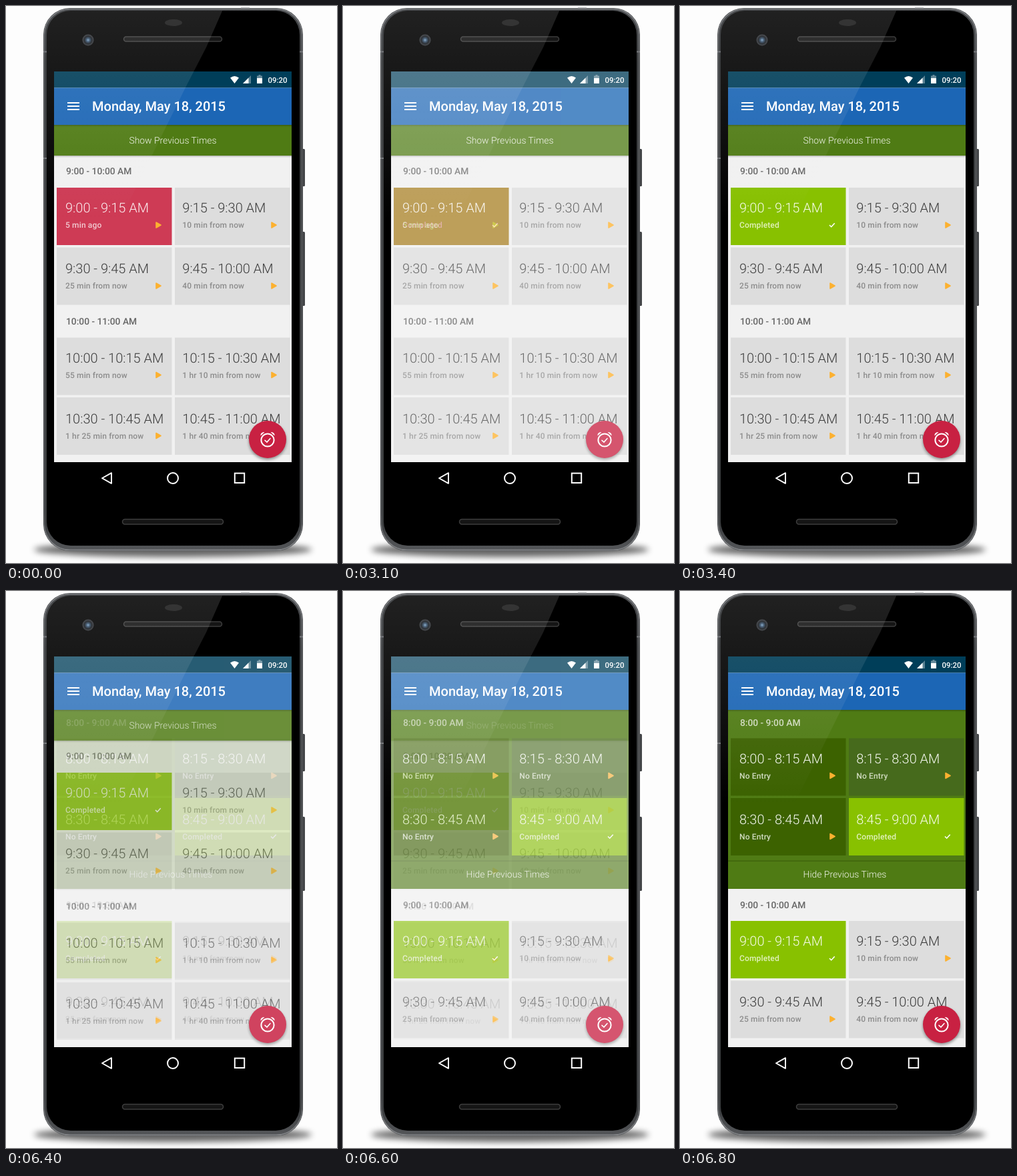
Write an HTML page that moves like this. It is 496x834 px and loops after 9.8 s.

```html
<!DOCTYPE html>
<html lang="en">
<head>
<meta charset="utf-8">
<title>Schedule</title>
<style>
  html, body { margin: 0; width: 100%; height: 100%; overflow: hidden; background: #fdfdfd; }
  svg { display: block; width: 496px; height: 834px; }
  text { font-family: Roboto, "Open Sans", sans-serif; text-rendering: geometricPrecision; }
  .title { font-size: 20px; font-weight: 500; }
  .time { font-size: 20px; font-weight: 300; }
  .note { font-size: 12px; font-weight: 500; letter-spacing: .14px; }
  .head { font-size: 13.8px; font-weight: 500; }
  .bar { font-size: 13.9px; font-weight: 300; text-anchor: middle; }
  .clock { font-size: 11.4px; font-weight: 500; }
  .line { fill: none; stroke: #fff; stroke-width: 2; }
  .thin { stroke-width: 1.6; }
</style>
</head>
<body>
<svg viewBox="0 0 496 834">
  <defs>
    <linearGradient id="metal" x2="0" y2="1">
      <stop offset="0" stop-color="#4b4d50"/>
      <stop offset=".1" stop-color="#3a3c3e"/>
      <stop offset=".95" stop-color="#3a3c3e"/>
      <stop offset="1" stop-color="#56585b"/>
    </linearGradient>
    <linearGradient id="rim" x2="0" y2="1">
      <stop offset="0" stop-color="#808285"/>
      <stop offset=".1" stop-color="#606265"/>
      <stop offset=".93" stop-color="#55575a"/>
      <stop offset="1" stop-color="#85878a"/>
    </linearGradient>
    <linearGradient id="gloss" gradientUnits="userSpaceOnUse" x1="0" y1="4" x2="0" y2="320">
      <stop offset="0" stop-color="#fff" stop-opacity=".13"/>
      <stop offset=".6" stop-color="#fff" stop-opacity=".06"/>
      <stop offset="1" stop-color="#fff" stop-opacity="0"/>
    </linearGradient>
    <linearGradient id="fall" x2="0" y2="1">
      <stop offset="0" stop-opacity=".25"/>
      <stop offset="1" stop-opacity="0"/>
    </linearGradient>
    <radialGradient id="lens">
      <stop offset="0" stop-color="#7ea3c6"/>
      <stop offset=".35" stop-color="#30475f"/>
      <stop offset=".65" stop-color="#15191e"/>
      <stop offset="1" stop-color="#3a3d42"/>
    </radialGradient>
    <filter id="blur" x="-20%" y="-100%" width="140%" height="300%">
      <feGaussianBlur stdDeviation="5"/>
    </filter>
    <filter id="soft" x="-30%" y="-30%" width="160%" height="160%">
      <feGaussianBlur stdDeviation="2"/>
    </filter>
    <clipPath id="glass"><rect x="72" y="98" width="356" height="585"/></clipPath>
    <clipPath id="face"><rect x="61" y="7" width="379" height="801" rx="36"/></clipPath>
  </defs>

  <!-- phone body -->
  <ellipse cx="250" cy="814" rx="208" ry="11" fill="#000" opacity=".6" filter="url(#blur)"/>
  <rect x="443" y="214" width="5" height="56" rx="1.5" fill="#45474a"/>
  <rect x="443" y="338" width="5" height="111" rx="1.5" fill="#45474a"/>
  <rect x="56" y="3" width="389" height="813" rx="40" fill="url(#metal)"/>
  <rect x="57.5" y="4.5" width="386" height="810" rx="38.5" fill="none" stroke="url(#rim)" stroke-width="1.6"/>
  <path d="M352 3.5h13M56 68.5h5M440 68.5h5M56 228h5" stroke="#77797c" stroke-width="2"/>
  <rect x="61" y="7" width="379" height="801" rx="36" fill="#000"/>
  <ellipse cx="251" cy="25" rx="13" ry="5" fill="#191919"/>
  <circle cx="123" cy="51" r="8.5" fill="url(#lens)"/>
  <g fill="#151515" stroke="#3d3d3d" stroke-width="1.5">
    <rect x="176.5" y="46" width="147" height="7" rx="3.5"/>
    <rect x="174.5" y="768.5" width="151" height="7.5" rx="3.7"/>
  </g>
  <g class="line">
    <path d="M144 707L158 699.2V714.8Z" stroke-linejoin="round"/>
    <circle cx="250" cy="707" r="8"/>
    <rect x="342.8" y="699.6" width="14.4" height="14.4"/>
  </g>

  <g clip-path="url(#glass)">
    <rect x="72" y="98" width="356" height="585" fill="#fff"/>
    <g id="due"></g>
    <g id="done"></g>
    <g id="past"></g>
  </g>
  <path d="M326 3L300 62L270 120L218 225L171 320H56V3Z" fill="url(#gloss)" clip-path="url(#face)"/>
</svg>

<script>
const rect = (x, y, w, h, fill) =>
  `<rect x="${x}" y="${y}" width="${w}" height="${h}" fill="${fill}"/>`;
const text = (x, y, cls, fill, str) =>
  `<text x="${x}" y="${y}" class="${cls}" fill="${fill}">${str}</text>`;

const style = (fill, ink, note, checked) => ({ fill, ink, note, checked });
const plain = style('#dddddd', '#3c3c3c', '#8c8c8c');
const late = style('#ce3b55', '#fbeef0', '#f2cad1');
const complete = style('#88c100', '#f8fcec', '#e2f1bd', true);
const dark = style('#3c6200', '#f5f8f0', '#d0dbbf');
const dim = style('#466a1c', '#f5f8f0', '#d0dbbf');

const play = (x, y) =>
  `<path d="M${x + 1} ${y - 4}l7 4l-7 4z" fill="#fcb130" stroke="#fcb130" stroke-width="1.6" stroke-linejoin="round"/>`;
const tick = (x, y) =>
  `<path d="M${x} ${y}l2.7 2.7l5 -5.5" class="line thin"/>`;

// Four cells in a two-column grid under a heading.
function section(top, headY, ink, title, cells) {
  return text(90, headY, 'head', ink, title) + cells.map(([time, note, s], i) => {
    const col = i % 2, row = i >> 1;
    const y = top + row * 91;
    const x = 89 + col * 175.3;
    const icon = s.checked ? tick : play;
    return rect(76 + col * 177, top + row * 89.5, 172.5, 86, s.fill) +
      text(x, y + 37, 'time', s.ink, time) +
      text(x, y + 60, 'note', s.note, note) +
      icon(224 + col * 173, y + 56);
  }).join('');
}

const nine = (top, headY, first) => section(top, headY, '#666', '9:00 - 10:00 AM', [
  first,
  ['9:15 - 9:30 AM', '10 min from now', plain],
  ['9:30 - 9:45 AM', '25 min from now', plain],
  ['9:45 - 10:00 AM', '40 min from now', plain]
]);

const ten = section(496.5, 476.5, '#666', '10:00 - 11:00 AM', [
  ['10:00 - 10:15 AM', '55 min from now', plain],
  ['10:15 - 10:30 AM', '1 hr 10 min from now', plain],
  ['10:30 - 10:45 AM', '1 hr 25 min from now', plain],
  ['10:45 - 11:00 AM', '1 hr 40 min from now', plain]
]);

const eight = section(220.5, 202, '#d0dbbf', '8:00 - 9:00 AM', [
  ['8:00 - 8:15 AM', 'No Entry', dark],
  ['8:15 - 8:30 AM', 'No Entry', dim],
  ['8:30 - 8:45 AM', 'No Entry', dark],
  ['8:45 - 9:00 AM', 'Completed', complete]
]);

const green = '#4f7b14';
const shade = y => rect(72, y, 356, 3, 'url(#fall)');

const toolbar =
  rect(72, 98, 356, 24.5, '#003e59') +
  rect(72, 122.5, 356, 55.5, '#1c66b5') +
  shade(178) +
  '<path d="M92 145h18M92 150h18M92 155h18" class="line"/>' +
  text(129, 157, 'title', '#fff', 'Monday, May 18, 2015') +
  '<path d="M336 107.5Q342.5 102.5 349 107.5L342.5 116Z" fill="#fff"/>' +
  '<path d="M367 104V116H355Z" fill="#fff" opacity=".35"/>' +
  '<path d="M363.5 107.5V116H355Z" fill="#fff"/>' +
  '<path d="M376 104.5h2.5v-1.5h3v1.5h2.5v4h-8z" fill="#fff" opacity=".4"/>' +
  rect(376, 108, 8, 8, '#fff') +
  text(392.5, 115, 'clock', '#fff', '09:20');

const button =
  '<circle cx="392" cy="651.5" r="28" opacity=".4" filter="url(#soft)"/>' +
  '<circle cx="392" cy="649" r="28" fill="#c82142"/>' +
  '<g class="line" stroke-linecap="round"><circle cx="392" cy="650" r="9.6"/>' +
  '<path d="M388 650.3l3 2.700l5 -5.500" class="thin"/></g>' +
  '<path d="M381.500 643.500q-.500 -5.500 6 -5.500zM402.500 643.500q.500 -5.500 -6 -5.500z" fill="#fff"/>';

const screen = body => rect(72, 98, 356, 585, '#f1f1f1') + body + toolbar + button;

const showBar = rect(72, 178, 356, 46, green) + shade(224) +
  text(250, 206, 'bar', '#f4f7ee', 'Show Previous Times');
const hideBar = rect(72, 403.5, 356, 1.5, '#3f650c') +
  text(247, 428.5, 'bar', '#f4f7ee', 'Hide Previous Times');

const first = ['9:00 - 9:15 AM', 'Completed', complete];
const layers = {
  due: showBar + nine(272, 252, ['9:00 - 9:15 AM', '5 min ago', late]) + ten,
  done: showBar + nine(272, 252, first) + ten,
  past: rect(72, 178, 356, 268, green) + eight + hideBar + nine(494, 474.5, first)
};

// Each screen dissolves into the next in five 100 ms steps, then cuts back.
const LOOP = 9800, STEP = 100, COUNT = 5;
const fade = (start, from, to) => Array.from({ length: COUNT }, (_, i) =>
  [start + i * STEP, from + (to - from) * (i + 1) / COUNT]);
const tracks = {
  due: [[0, 1], ...fade(3000, 1, 0)],
  done: [[0, 0], ...fade(3000, 0, 1), ...fade(6400, 1, 0)],
  past: [[0, 0], ...fade(6400, 0, 1)]
};

for (const [id, body] of Object.entries(layers)) {
  const el = document.getElementById(id);
  el.innerHTML = screen(body);
  const keys = tracks[id].map(([ms, opacity]) =>
    ({ offset: ms / LOOP, opacity, easing: 'step-end' }));
  keys.push({ offset: 1, opacity: keys[keys.length - 1].opacity });
  el.animate(keys, { duration: LOOP, iterations: Infinity }).startTime = 0;
}
</script>
</body>
</html>
```
